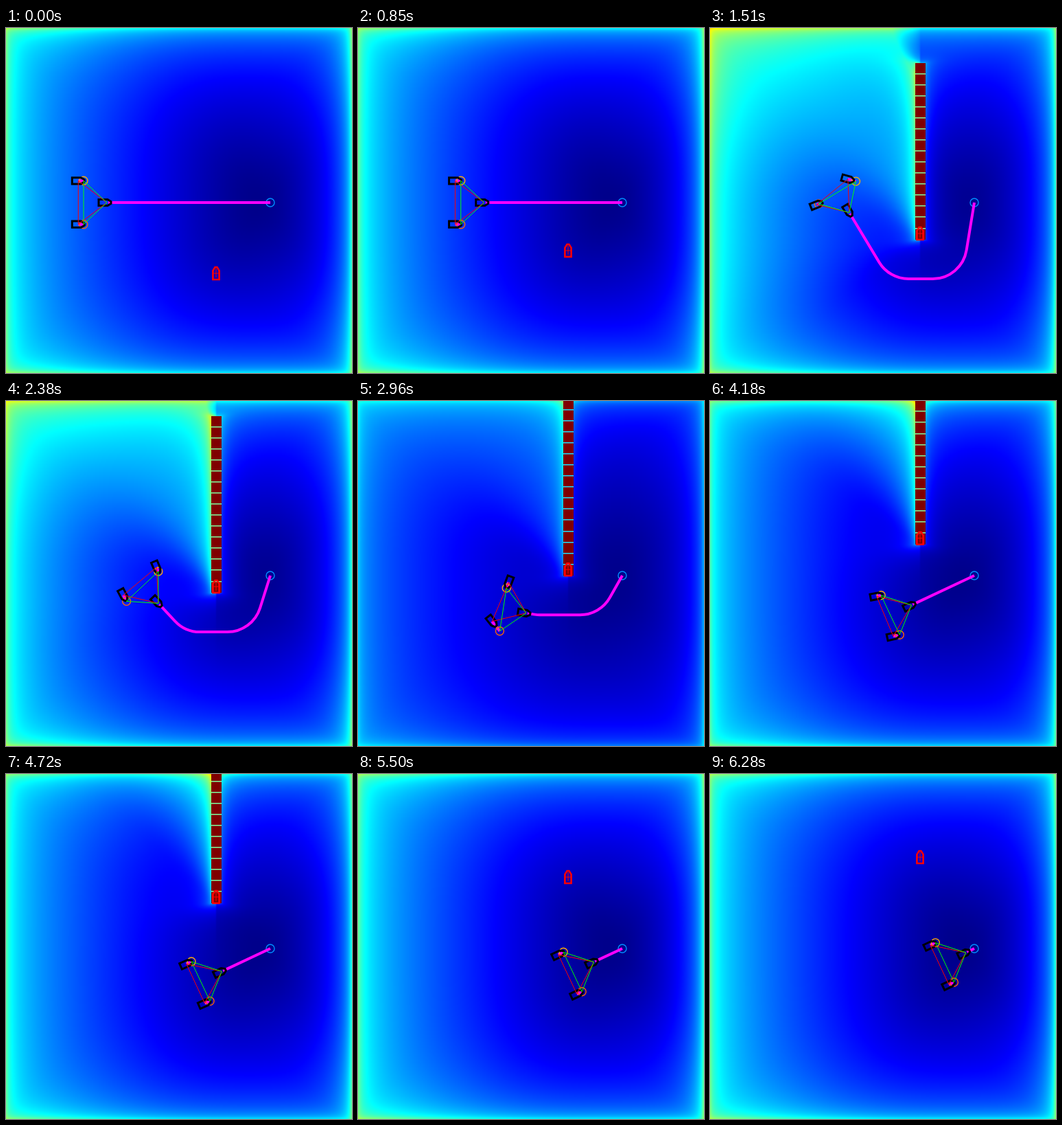
Animation, 504 px wide and 502 px high, one loop 6.4 s. Source, as an HTML page with a canvas:

```html
<!DOCTYPE html>
<html lang="en">
<head>
<meta charset="utf-8">
<title>Formation path planning</title>
<style>
  html, body { margin: 0; width: 100%; height: 100%; overflow: hidden; background: #00f; }
  canvas { display: block; }
</style>
</head>
<body>
<canvas id="stage" width="504" height="502"></canvas>
<script>
const W = 504, H = 502, LOOP = 6400, STEPS = 58;
const STEP_MS = 110.9, STEP_SHIFT = 56;
const SPEED = 4.6, BOAT_SPEED = 4.14, CHASE = .36, SENSE = 127;
const ARM = 46.5, SPREAD = 43 * Math.PI / 180;
const WALL_X = 306, WALL_LEN = 257, BLOCK = 16.07;
const goal = { x: 385, y: 254 };
const ctx = document.getElementById('stage').getContext('2d');

const polar = (p, angle, len) => ({ x: p.x + len * Math.cos(angle), y: p.y + len * Math.sin(angle) });
const bearing = (a, b) => Math.atan2(b.y - a.y, b.x - a.x);
const dist = (a, b) => Math.hypot(b.x - a.x, b.y - a.y);

// ---- Simulation: the leader follows its route, the followers chase their slots ----
function route(from, boatY, blocked) {
  const low = boatY + 66;
  const left = { x: 261, y: low }, right = { x: 270 + .265 * low, y: low };
  const under = (a, b, p) => a.x < p.x && a.y + (b.y - a.y) * (p.x - a.x) / (b.x - a.x) < p.y;
  const points = [goal];
  if (blocked && under(from, goal, right)) {
    points.unshift(right);
    if (under(from, right, left)) points.unshift(left);
  }
  return points;
}

function simulate() {
  const states = [];
  let lead = { x: 144, y: 254 }, angle = 0, followers = null;
  for (let k = 0; k < STEPS; k++) {
    const boat = { x: WALL_X, y: 357 - BOAT_SPEED * k };
    const blocked = dist(lead, boat) < SENSE;
    const path = route(lead, boat.y, blocked);
    angle = bearing(lead, path[0]);
    const apex = polar(lead, angle, 3);
    const slots = [1, -1].map(side => polar(apex, angle + Math.PI + side * SPREAD, ARM));
    followers = slots.map((slot, i) => {
      const old = followers ? followers[i] : polar(slot, 0, -12);
      const p = { x: old.x + CHASE * (slot.x - old.x), y: old.y + CHASE * (slot.y - old.y) };
      return { ...p, slot, angle: bearing(p, slot) };
    });
    states.push({ lead, apex, angle, path, followers, boat, blocked });
    lead = polar(lead, angle, SPEED);
  }
  return states;
}
const states = simulate();

// ---- Potential field, at half size ----
const FW = W / 2, FH = H / 2;
const fieldCanvas = Object.assign(document.createElement('canvas'), { width: FW, height: FH });
const fieldCtx = fieldCanvas.getContext('2d');
const image = fieldCtx.createImageData(FW, FH);
const sink = { x: 375, y: 254 };

const rise = (d, len) => -.05 * Math.log(1 - Math.exp(-(d + 2) / len));
const level = r => .00088 * (Math.hypot(r, 45) - 45);
const norm = (dx, dy) => {
  const a = Math.abs(dx), b = Math.abs(dy) * .85;
  return Math.cbrt(a * a * a + b * b * b);
};
const edgeX = Array.from({ length: FW }, (_, i) => rise(2 * i, 60) + 1.9 * rise(W - 2 - 2 * i, 60));
const edgeY = Array.from({ length: FH }, (_, j) => 1.15 * (rise(2 * j, 60) + rise(H - 2 - 2 * j, 60)));
const edge = new Float32Array(FW * FH).map((_, n) =>
  Math.cbrt(edgeX[n % FW] ** 3 + edgeY[Math.floor(n / FW)] ** 3));

function makeWall(boatY) {
  const bottom = boatY + 9, top = bottom - WALL_LEN, tip = bottom + 4;
  const toSink = y => norm(sink.x - WALL_X, sink.y - y);
  return { top, bottom, tip, tipLen: toSink(tip), topLen: toSink(top), gap: top > 2 };
}

// Shadow of a detour: steep near the end of the wall, then level.
const shadow = (leg, rest, direct) =>
  250 * (1 - Math.exp(-Math.max(0, leg + rest - direct) / 30)) / (1 + leg / 600);

// Distance to the sink, lengthened behind the wall.
function reach(x, y, wall) {
  const direct = norm(sink.x - x, sink.y - y);
  if (!wall || x >= WALL_X) return direct;
  const side = WALL_X - x;
  const cross = y + (sink.y - y) * side / (sink.x - x);
  if (cross >= wall.tip) return direct;
  let extra = shadow(norm(side, wall.tip - y), wall.tipLen, direct);
  if (wall.gap) {
    let over = 11000 / wall.top * (1 - Math.exp(-side / 40));
    if (cross > wall.top) over += shadow(norm(side, wall.top - y), wall.topLen, direct);
    extra = Math.min(extra, over);
  }
  return direct + extra;
}

function wallGlow(x, y, wall) {
  const dx = Math.max(0, Math.abs(x - WALL_X) - 7);
  const dy = Math.max(0, wall.top - y, y - wall.bottom);
  return (x < WALL_X ? 1.7 : 1.1) * rise(Math.hypot(dx, dy * 2), x < WALL_X ? 45 : 30);
}

// The range of values jumps when the gap above the wall closes, then recovers.
const fieldScale = wall =>
  !wall || wall.gap ? 1.02 : 1 - .33 * Math.exp(wall.top / BOAT_SPEED / 6);

const channel = v => 255 * Math.min(1, Math.max(0, v));

function drawField(wall, scale) {
  for (let n = 0; n < edge.length; n++) {
    const x = 2 * (n % FW) + 1, y = 2 * Math.floor(n / FW) + 1;
    let v = edge[n] + level(reach(x, y, wall));
    if (wall) v += wallGlow(x, y, wall);
    v *= 4 * scale;
    for (let c = 0; c < 3; c++) image.data[4 * n + c] = channel(1.5 - Math.abs(v - 3 + c));
    image.data[4 * n + 3] = 255;
  }
  fieldCtx.putImageData(image, 0, 0);
  ctx.drawImage(fieldCanvas, 0, 0, W, H);
}

// ---- Shapes ----
function stroke(color, width) {
  ctx.strokeStyle = color;
  ctx.lineWidth = width;
  ctx.stroke();
}

function line(points, color, width, closed) {
  ctx.beginPath();
  points.forEach(p => ctx.lineTo(p.x, p.y));
  if (closed) ctx.closePath();
  stroke(color, width);
}

function ring(p, color) {
  ctx.beginPath();
  ctx.arc(p.x, p.y, 6, 0, Math.PI * 2);
  stroke(color, 1.4);
}

function drawBoat(p, angle, color, cross) {
  ctx.save();
  ctx.translate(p.x, p.y);
  ctx.rotate(angle);
  ctx.beginPath();
  ctx.moveTo(-9, -4.6);
  ctx.lineTo(4, -4.6);
  ctx.lineTo(9, -1.5);
  ctx.lineTo(9, 1.5);
  ctx.lineTo(4, 4.6);
  ctx.lineTo(-9, 4.6);
  ctx.closePath();
  stroke(color, cross ? 2.6 : 3);
  if (cross) {
    line([{ x: -6, y: 0 }, { x: 7, y: 0 }], color, 1);
    line([{ x: 0, y: -4 }, { x: 0, y: 4 }], color, 1);
  }
  ctx.restore();
}

function drawWall(wall, boatY, scale) {
  ctx.fillStyle = '#800000';
  ctx.fillRect(299, wall.top, 15, wall.bottom - wall.top);
  ctx.fillStyle = scale < .8 ? '#20e0ff' : '#80ffa0';
  for (let y = boatY - 7.5; y > wall.top + 4; y -= BLOCK)
    ctx.fillRect(299, Math.round(y) - 1, 15, 1.5);
}

function drawPath(from, path) {
  ctx.beginPath();
  ctx.moveTo(from.x, from.y);
  path.forEach((p, i) => {
    const next = path[i + 1];
    if (next) ctx.arcTo(p.x, p.y, next.x, next.y, 50);
    else ctx.lineTo(p.x, p.y);
  });
  stroke('#f0f', 4);
}

function draw({ lead, apex, angle, path, followers, boat, blocked }) {
  const wall = blocked ? makeWall(boat.y) : null;
  const scale = fieldScale(wall);
  drawField(wall, scale);
  if (wall) drawWall(wall, boat.y, scale);
  drawBoat(boat, -Math.PI / 2, '#f00', true);

  ring(goal, '#0090ff');
  drawPath(polar(lead, angle, 5), path);
  followers.forEach((f, i) => {
    line([f, f.slot], '#f0f', 4);
    ring(f.slot, i ? '#f60' : '#fa0');
  });
  drawBoat(lead, angle, '#000');
  followers.forEach(f => drawBoat(f, f.angle, '#000'));
  line([apex, ...followers], '#f00', 1, true);
  line([apex, ...followers.map(f => f.slot)], '#0f0', 1, true);
}

let shown = -1;
function tick() {
  const t = performance.now() % LOOP;
  const k = Math.min(STEPS - 1, Math.floor((t + STEP_SHIFT) / STEP_MS));
  if (k !== shown) draw(states[shown = k]);
  requestAnimationFrame(tick);
}
tick();
</script>
</body>
</html>
```
